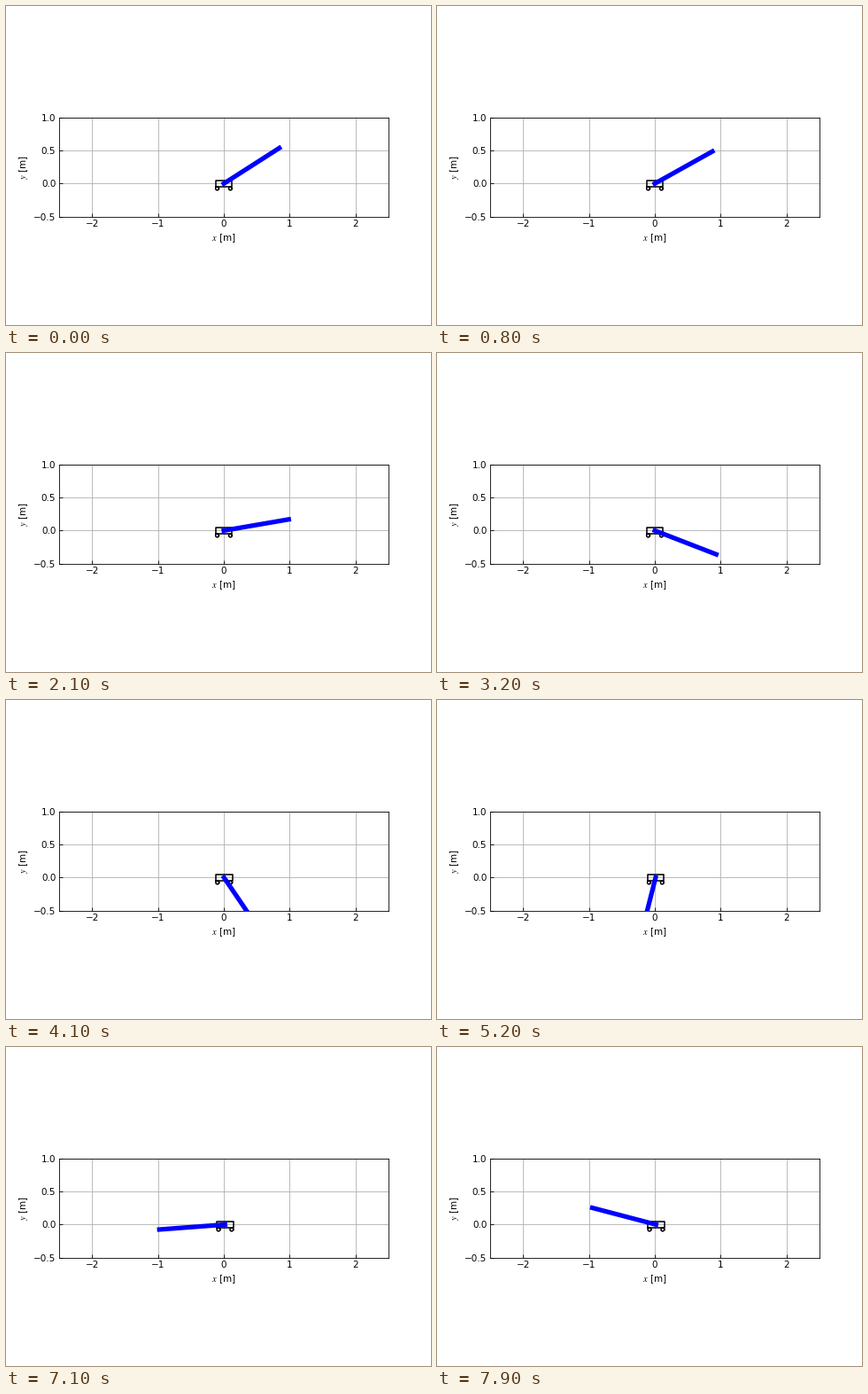
Write a matplotlib script that moves like this. It is 480x360 px and loops after 8 s.

```python
import matplotlib.pyplot as plt
import numpy as np
from matplotlib.animation import FuncAnimation

plt.rcParams.update({
    "font.family": "DejaVu Sans",
    "mathtext.fontset": "stix",
    "xtick.direction": "in",
    "ytick.direction": "in",
})

FRAMES, INTERVAL = 80, 100
LENGTH = 1.0
CART_W, CART_H = 0.25, 0.1
WHEEL_R = 0.025
STIFFNESS = 0.00198           # gravity / length, per frame squared
START, SPEED = np.radians(32.6), -0.0008


def swing(n, substeps=20):
    """Angles of a freely falling pole, measured from the x axis."""
    dt = 1 / substeps
    angle, speed, angles = START, SPEED, []
    for _ in range(n):
        angles.append(angle)
        for _ in range(substeps):
            mid = angle + speed * dt / 2
            speed -= STIFFNESS * np.cos(mid) * dt
            angle = mid + speed * dt / 2
    return np.array(angles)


def box(x):
    w, h = CART_W / 2, CART_H / 2
    return x + np.array([-w, w, w, -w, -w]), np.array([-h, -h, h, h, -h])


def wheel(x):
    a = np.linspace(0, 2 * np.pi, 40)
    return x + WHEEL_R * np.cos(a), -CART_H / 2 - WHEEL_R + WHEEL_R * np.sin(a)


angles = swing(FRAMES)
drift = np.interp(np.arange(FRAMES), [0, 34, 44, 52, 64, 79],
                  [0, 0, 0.004, 0.012, 0.019, 0.019])

fig = plt.figure(figsize=(6.4, 4.8), dpi=75)
ax = fig.add_subplot(111)
ax.set_aspect("equal")
ax.set_xlim(-2.5, 2.5)
ax.set_ylim(-0.5, 1.0)
ax.set_xticks(range(-2, 3))
ax.set_yticks(np.arange(-0.5, 1.1, 0.5))
ax.set_xlabel("$x$ [m]")
ax.set_ylabel("$y$ [m]")
ax.grid(True)

cart, left, right = (ax.plot([], [], "k", lw=1.5)[0] for _ in range(3))
pole, = ax.plot([], [], "b", lw=5)


def update(i):
    x, a = drift[i], angles[i]
    cart.set_data(*box(x))
    left.set_data(*wheel(x - 0.1))
    right.set_data(*wheel(x + 0.1))
    pole.set_data([x, x + LENGTH * np.cos(a)], [0, LENGTH * np.sin(a)])
    return cart, left, right, pole


anim = FuncAnimation(fig, update, frames=FRAMES, interval=INTERVAL,
                     repeat=True, repeat_delay=0, blit=False)
plt.show()
```
